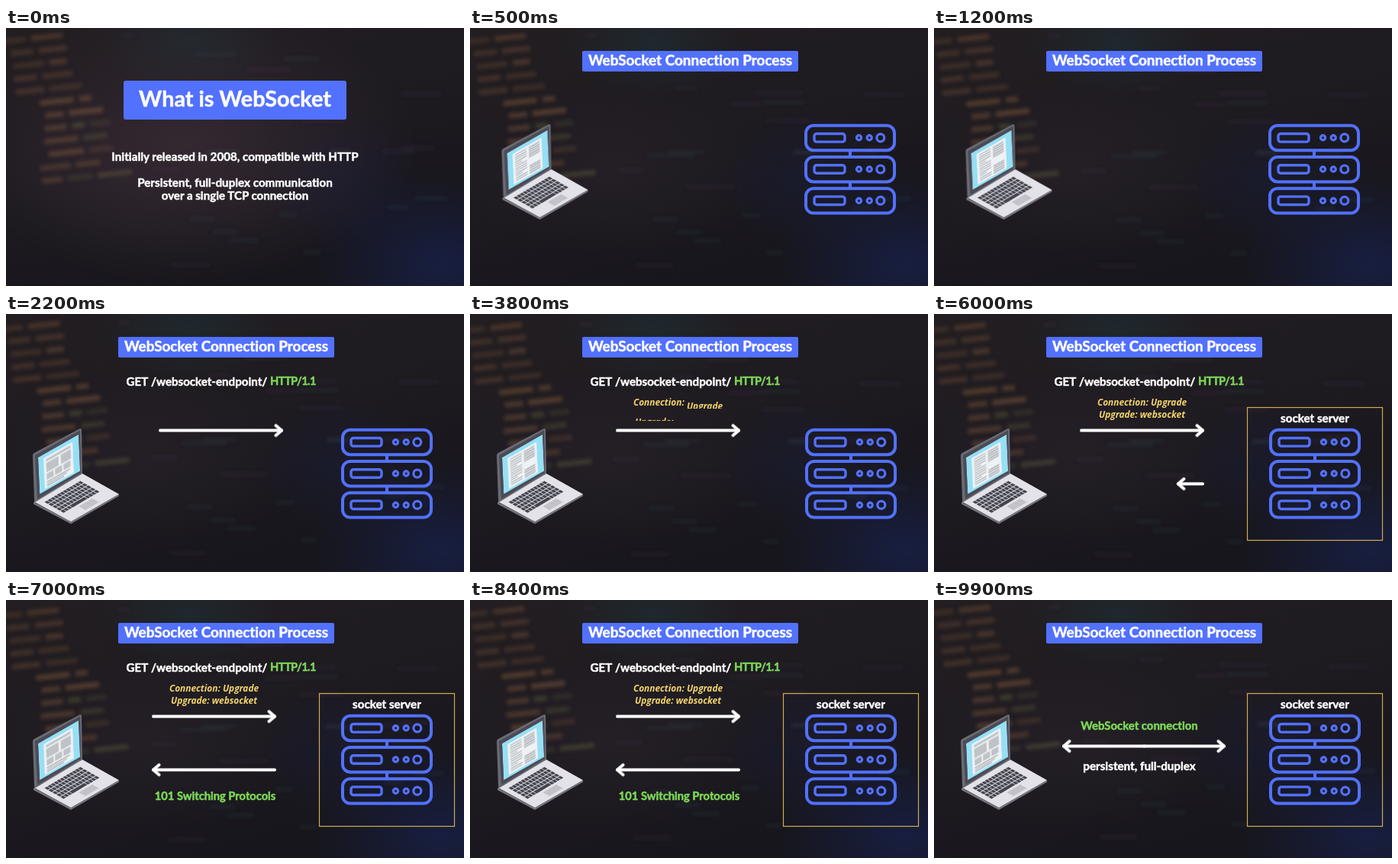
Write an HTML page that moves like this. It is 600x338 px and loops after 10000 ms.

```html
<!DOCTYPE html>
<html lang="en">
<head>
<meta charset="utf-8">
<title>WebSocket connection process</title>
<style>
  html, body { margin: 0; width: 100%; height: 100%; overflow: hidden; background: #1a181d; }
  #stage { position: absolute; left: 0; top: 0; width: 600px; height: 338px; overflow: hidden; }
  #stage > div, #stage > svg, .layer, .layer > svg { position: absolute; left: 0; top: 0; width: 600px; height: 338px; }
  .line {
    position: absolute; height: 24px; line-height: 24px; overflow: hidden; white-space: nowrap;
    font-family: Lato, "Open Sans", sans-serif; font-weight: 700; color: #fff;
    font-variant-ligatures: none; -webkit-text-stroke: .5px currentColor;
  }
  .line.note { height: 18px; font: italic 700 11.9px/18px "Open Sans", "Noto Sans", sans-serif; color: #f3d469; -webkit-text-stroke: 0; }
  .green { color: #7ed957; }
  .tight { letter-spacing: -.55px; }
  .plate { position: absolute; background: #5271ff; border-radius: 3px; }

  /* One percent of the main loop is 100 ms. */
  .layer, .loop { animation: 10s linear infinite both; }
  #title, #glow { animation-name: title; }
  #scene { animation-name: scene; }
  #request { animation-name: request; }
  #reply { animation-name: reply; }
  #duplex { animation-name: duplex; }
  #owner { animation-name: owner; }
  #laptop { animation-name: laptop; }
  #server { animation-name: server; }
  #ask { animation-name: ask; }
  #code { animation-name: drift; }
  #pages { animation: pages 2.5s ease-in-out infinite both; }
  .word { display: inline-block; animation: rise 10s linear infinite both; }
  .shaft { stroke-dasharray: 1 2; animation: draw 10s linear infinite both; }
  .head { animation: push 10s linear infinite both; }

  @keyframes title { 0%, 1% { opacity: 1 } 3%, 100% { opacity: 0 } }
  @keyframes scene { 0%, 1% { opacity: 0 } 4%, 100% { opacity: 1 } }
  @keyframes request { 0%, 14.99% { opacity: 0 } 15%, 91% { opacity: 1 } 93%, 100% { opacity: 0 } }
  @keyframes reply { 0%, 58.99% { opacity: 0 } 59%, 91% { opacity: 1 } 93%, 100% { opacity: 0 } }
  @keyframes duplex { 0%, 91.99% { opacity: 0 } 92%, 100% { opacity: 1 } }
  @keyframes owner { 0%, 48% { opacity: 0 } 51%, 100% { opacity: 1 } }
  @keyframes laptop {
    0%, 12% { transform: translate(6.5px, -24px); animation-timing-function: ease-in-out }
    17%, 100% { transform: none }
  }
  @keyframes server {
    0%, 12% { transform: translate(-1px, -24px); animation-timing-function: ease-in-out }
    17%, 100% { transform: none }
  }
  @keyframes ask {
    0%, 26% { transform: translateX(9px); animation-timing-function: ease-in-out }
    30%, 100% { transform: none }
  }
  @keyframes rise { 0% { transform: translateY(100%) } 4%, 82% { transform: none } 82.01%, 100% { transform: translateY(100%) } }
  @keyframes draw { 0% { stroke-dashoffset: 1 } 5%, 82% { stroke-dashoffset: 0 } 82.01%, 100% { stroke-dashoffset: 1 } }
  @keyframes push {
    0% { transform: translateX(var(--back)) }
    5%, 82% { transform: none }
    82.01%, 100% { transform: translateX(var(--back)) }
  }
  @keyframes pages {
    0%, 3% { transform: none }
    8%, 60% { transform: translateY(-47px) }
    80%, 100% { transform: translateY(-94px) }
  }
  @keyframes drift { 0%, 100% { transform: none } 50% { transform: translate(-8px, 6px) } }
</style>
</head>
<body>
<div id="stage">
  <svg viewBox="0 0 600 338">
    <defs>
      <linearGradient id="base" x2=".5" y2="1">
        <stop offset="0" stop-color="#231e21"/>
        <stop offset=".5" stop-color="#1e1b21"/>
        <stop offset="1" stop-color="#17161c"/>
      </linearGradient>
      <radialGradient id="blue">
        <stop offset="0" stop-color="#17214c" stop-opacity=".75"/>
        <stop offset="1" stop-color="#17214c" stop-opacity="0"/>
      </radialGradient>
      <radialGradient id="teal">
        <stop offset="0" stop-color="#1d3036" stop-opacity=".6"/>
        <stop offset="1" stop-color="#1d3036" stop-opacity="0"/>
      </radialGradient>
      <radialGradient id="mauve">
        <stop offset="0" stop-color="#3a2c36" stop-opacity=".75"/>
        <stop offset="1" stop-color="#3a2c36" stop-opacity="0"/>
      </radialGradient>
      <filter id="soft" x="-20%" y="-20%" width="140%" height="140%"><feGaussianBlur stdDeviation="2.600"/></filter>
    </defs>
    <rect width="600" height="338" fill="url(#base)"/>
    <ellipse cx="570" cy="310" rx="170" ry="120" fill="url(#blue)"/>
    <ellipse cx="440" cy="200" rx="110" ry="90" fill="url(#blue)" opacity=".4"/>
    <ellipse cx="240" cy="20" rx="120" ry="70" fill="url(#teal)"/>
    <ellipse cx="190" cy="190" rx="200" ry="110" fill="url(#mauve)" opacity=".35"/>
    <ellipse id="glow" class="loop" cx="240" cy="150" rx="300" ry="190" fill="url(#mauve)"/>
    <g id="code" class="loop"><g id="rows" filter="url(#soft)"/></g>
  </svg>

  <div id="title" class="layer">
    <div class="plate" style="left:154px;top:69px;width:292px;height:51px"></div>
  </div>

  <div id="scene" class="layer">
    <div class="plate" style="left:147px;top:30px;width:283px;height:27px;border-radius:2px"></div>
    <svg viewBox="0 0 600 338">
      <g id="laptop" class="loop">
        <path d="M36 246 85 272 148 236V238.500L85 275 36 249Z" fill="#74747e"/>
        <path d="M37 246 100 209 148 236 85 272Z" fill="#e4e2e9"/>
        <g id="keys" transform="matrix(6.3 -3.7 4.8 2.7 37 246)" fill="#44454e">
          <rect x="3.7" y="7.3" width="2.8" height="1.8" fill="#c3c1ca"/>
        </g>
        <path d="M35 185Q35 183 37 182L96 150.500Q99 149 99 152L100 209 39 246Q37 246 37 243Z" fill="#6a6a75"/>
        <path d="M38 185 97 152.500 98 208 41 243Z" fill="#4a4b55"/>
        <g transform="matrix(1 -.57 .045 1 42 188)">
          <svg width="53" height="48">
            <rect width="53" height="48" fill="#96dff5"/>
            <g id="pages"/>
          </svg>
        </g>
      </g>
      <g id="server" class="loop" fill="none" stroke="#5271ff" stroke-width="4"/>
    </svg>
    <div id="owner" class="layer">
      <svg viewBox="0 0 600 338"><rect x="410.500" y="122.500" width="177" height="174" fill="none" stroke="#d2aa50" stroke-width="1.200"/></svg>
    </div>
    <div id="request" class="layer"><svg viewBox="0 0 600 338"><g id="ask" class="loop"/></svg></div>
    <div id="reply" class="layer"><svg viewBox="0 0 600 338"><g id="answer"/></svg></div>
    <div id="duplex" class="layer"><svg viewBox="0 0 600 338"><g id="both"/></svg></div>
  </div>
</div>

<script>
const $ = id => document.getElementById(id);

function add(parent, tag, attrs) {
  const el = document.createElementNS("http://www.w3.org/2000/svg", tag);
  for (const k in attrs) el.setAttribute(k, attrs[k]);
  return parent.appendChild(el);
}

const box = (parent, x, y, width, height, more) => add(parent, "rect", { x, y, width, height, ...more });

// Text centred on x (or starting at x with left), y is the middle of the line.
function line(parent, text, x, y, { size, cls = "", start, left } = {}) {
  const el = document.createElement("div"), h = cls === "note" ? 18 : 24;
  el.className = "line " + cls;
  el.style.cssText = `top:${y - h / 2}px;left:${left ? x : x - 200}px;` +
    (left ? "" : "width:400px;text-align:center;") + (size ? `font-size:${size}px;` : "");
  if (size > 20) el.style.overflow = "visible";
  if (start === undefined) el.textContent = text;
  else text.split(" ").forEach((w, i) => {
    const span = document.createElement("span");
    span.className = "word";
    span.style.animationDelay = start + i * 110 + "ms";
    span.textContent = w;
    if (i) el.append(" ");
    el.append(span);
  });
  $(parent).append(el);
}

// Arrow that grows from x by len; dir is 1 for right, -1 for left.
function arrow(parent, x, y, len, dir, start) {
  const g = add($(parent), "g", {
    transform: `translate(${x} ${y}) scale(${dir} 1)`, fill: "none", stroke: "#fff",
    "stroke-width": 4, "stroke-linecap": "round", "stroke-linejoin": "round"
  });
  const delay = `animation-delay:${start}ms`;
  add(g, "path", { d: `M0 0H${len}`, pathLength: 1, class: "shaft", style: delay });
  add(g, "path", { d: `M${len - 7.5} -6.500 ${len} 0 ${len - 7.5} 6.500`, class: "head", style: `--back:${-len}px;${delay}` });
}

let seed = 11;
const rnd = () => (seed = seed * 16807 % 2147483647) / 2147483647;

// Blurred, tilted lines of code behind everything
function codeBlock(left, right, top, bottom, strength) {
  const g = add($("rows"), "g", { transform: `rotate(-6 ${left} ${top})` });
  for (let y = top; y < bottom; y += 17) {
    let x = left + rnd() * 16;
    while (x < right) {
      const w = 16 + rnd() * 30;
      box(g, x, y, w, 7, { fill: rnd() > .8 ? "#6b6a40" : "#966642", opacity: strength * (.5 + rnd() * .5) });
      x += w + 7;
    }
  }
}
codeBlock(-4, 75, 14, 90, .42);
codeBlock(34, 110, 96, 215, .42);
for (let i = 0; i < 26; i++)
  box($("rows"), 150 + rnd() * 420, rnd() * 320, 15 + rnd() * 50, 5, { fill: i % 2 ? "#35525c" : "#4c3c58", opacity: .2 });

// Keyboard
for (let r = 0; r < 5; r++)
  for (let c = 0; c < 12; c++)
    if (r < 4 || c < 3 || c > 7) box($("keys"), 1 + c * .63, 1.5 + r * 1.08, .52, .88);
box($("keys"), 2.89, 5.82, 3.05, .88);

// Screen pages: a block layout, a text layout, the block layout again
const paper = y => box($("pages"), 7, y + 5, 38, 40, { fill: "#eef2f4" });
function blocks(y) {
  const p = $("pages"), fill = "#bfc3c8";
  paper(y);
  box(p, 10, y + 8, 32, 3, { fill });
  box(p, 10, y + 13, 16, 12, { fill });
  box(p, 29, y + 13, 13, 12, { fill });
  for (let i = 0; i < 3; i++) {
    box(p, 10 + i * 11, y + 27, 9, 8, { fill });
    box(p, 10, y + 37 + i * 2.6, 30 - i * 4, 1.3, { fill: "#a6abb2" });
  }
}
blocks(0);
paper(47);
for (let i = 0; i < 12; i++) {
  box($("pages"), 10, 55 + i * 3, i % 5 > 3 ? 9 : 15, 1.3, { fill: "#b0b4ba" });
  if (i < 5 || i > 7) box($("pages"), 28, 55 + i * 3, 14, 2, { fill: "#b4b8be" });
}
blocks(94);

// Server rack
for (let i = 0; i < 3; i++) {
  const s = $("server"), y = 151.8 + i * 41.2, cy = y + 16;
  box(s, 441, y, 116, 32.4, { rx: 10 });
  box(s, 452, cy - 5.3, 40, 10.6, { rx: 3, "stroke-width": 3.4 });
  [[510.5, 3.1], [524.2, 3.1], [538.8, 5]].forEach(([cx, r]) => add(s, "circle", { cx, cy, r, "stroke-width": 3.2 }));
  if (i) add(s, "path", { d: `M499 ${y - 9}V${y}` });
}

line("title", "What is WebSocket", 300, 91.5, { size: 28.8 });
line("title", "Initially released in 2008, compatible with HTTP", 300, 167.5, { size: 15.2 });
line("title", "Persistent, full-duplex communication", 300, 201.5, { size: 15.2 });
line("title", "over a single TCP connection", 300, 219, { size: 15.1 });

line("scene", "WebSocket Connection Process", 288.5, 42, { size: 18.9 });
line("owner", "socket server", 499, 136, { size: 15.2 });

line("request", "GET /websocket-endpoint/", 157.5, 88, { size: 15.1, start: 1500, left: true });
line("request", "HTTP/1.1", 346, 88, { size: 14.6, cls: "green tight", start: 1720, left: true });
line("request", "Connection: Upgrade", 272.5, 115, { cls: "note", start: 3400 });
line("request", "Upgrade: websocket", 272.5, 130.5, { cls: "note", start: 3620 });
arrow("ask", 193, 152.5, 159, 1, 1600);

arrow("answer", 352, 222.5, 159, -1, 5900);
line("reply", "101 Switching Protocols", 274, 256, { size: 14.7, cls: "green", start: 6200 });

arrow("both", 275, 191.5, 105, 1, 9200);
arrow("both", 275, 191.5, 105, -1, 9200);
line("duplex", "WebSocket connection", 269, 163.5, { size: 14.9, cls: "green", start: 9200 });
line("duplex", "persistent, full-duplex", 269, 217, { size: 15.2, start: 9300 });
</script>
</body>
</html>
```
